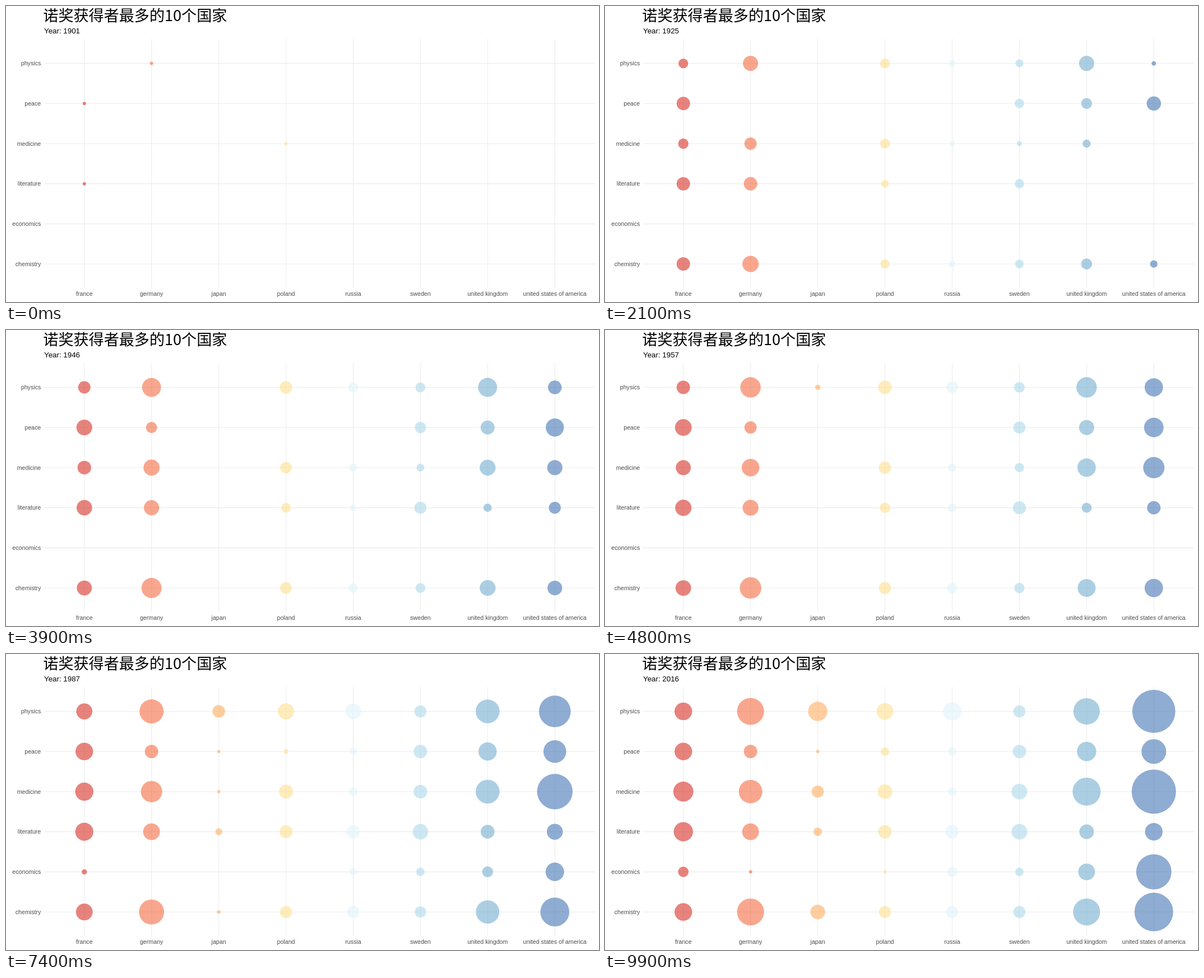
Animation of 1058 by 529 pixels, one loop 10000 ms. Source, as an HTML page with a canvas:

```html
<!DOCTYPE html>
<html lang="zh-CN">
<head>
<meta charset="utf-8">
<style>
  html, body { margin: 0; width: 100%; height: 100%; overflow: hidden; background: #fff; }
  canvas { display: block; }
</style>
</head>
<body>
<canvas id="chart" width="1058" height="529"></canvas>
<script>
const ctx = document.getElementById("chart").getContext("2d");
const FRAMES = 100, FRAME_MS = 100, FIRST = 1901, SPAN = 115;
const fields = ["physics", "peace", "medicine", "literature", "economics", "chemistry"];
const countries = [], bubbles = [];
const columnX = i => 139.75 + 119.92 * i;
const rowY = i => 102.55 + 71.7 * i;
const frameOf = year => Math.round((year - FIRST) * (FRAMES - 1) / SPAN);

// Each field: first and last award year, final number of laureates, and
// optionally the pace (exponent) at which the radius approaches its final size.
function country(name, color, awards) {
  const x = columnX(countries.push(name) - 1);
  for (const [field, [first, last, total, pace = 0.5 + 2 / total ** 2]] of Object.entries(awards)) {
    bubbles.push({
      x, y: rowY(fields.indexOf(field)), color, pace,
      growth: 4.5 * Math.sqrt(total - 1),
      start: frameOf(first), end: frameOf(last)
    });
  }
}

country("france", "#d73027", {
  physics: [1903, 2007, 9],
  peace: [1901, 1968, 9, 0.35],
  medicine: [1907, 2008, 12],
  literature: [1901, 2014, 11, 0.3],
  economics: [1983, 2005, 3],
  chemistry: [1906, 2016, 9, 0.2]
});
country("germany", "#f46d43", {
  physics: [1901, 2016, 23, 0.45],
  peace: [1926, 1973, 5, 0.3],
  medicine: [1905, 2008, 17],
  literature: [1902, 1972, 8, 0.25],
  economics: [2005, 2005, 1],
  chemistry: [1902, 2007, 23, 0.4]
});
country("japan", "#fdae61", {
  physics: [1949, 2015, 11, 1],
  peace: [1974, 1974, 1],
  medicine: [1987, 2016, 4, 1.5],
  literature: [1968, 1994, 2],
  chemistry: [1981, 2010, 6, 2]
});
country("poland", "#fee090", {
  physics: [1903, 1992, 8],
  peace: [1983, 1995, 2],
  medicine: [1901, 1999, 6, 0.4],
  literature: [1905, 1999, 5],
  economics: [1994, 1994, 1],
  chemistry: [1911, 1950, 4, 0.4]
});
country("russia", "#e0f3f8", {
  physics: [1911, 2010, 10, 0.8],
  peace: [1975, 1990, 2],
  medicine: [1904, 1950, 2],
  literature: [1933, 1987, 5, 0.8],
  economics: [1973, 2007, 3],
  chemistry: [1910, 1977, 4]
});
country("sweden", "#abd9e9", {
  physics: [1912, 1981, 4, 0.4],
  peace: [1908, 1982, 5, 0.35],
  medicine: [1911, 2000, 7, 1.1],
  literature: [1909, 1990, 7, 0.45],
  economics: [1974, 1977, 2],
  chemistry: [1903, 2015, 4, 0.3]
});
country("united kingdom", "#74add1", {
  physics: [1904, 2016, 22, 0.4],
  peace: [1903, 1998, 11],
  medicine: [1922, 2016, 25],
  literature: [1932, 1995, 6],
  economics: [1972, 2016, 8],
  chemistry: [1904, 2009, 23, 0.7]
});
country("united states of america", "#4575b4", {
  physics: [1923, 2012, 63, 1],
  peace: [1906, 2009, 19, 0.4],
  medicine: [1933, 2009, 67, 0.7],
  literature: [1930, 2016, 9, 0.3],
  economics: [1970, 2014, 41, 0.8],
  chemistry: [1914, 2015, 50, 1]
});

function radiusAt({ start, end, growth, pace }, frame) {
  if (frame < start) return 0;
  const progress = frame < end ? (frame - start) / (end - start) : 1;
  return 3 + growth * progress ** pace;
}

function text(str, x, y, size, color, align = "left", family = '"Liberation Sans", Arial, sans-serif') {
  ctx.font = `${size}px ${family}`;
  ctx.fillStyle = color;
  ctx.textAlign = align;
  ctx.fillText(str, x, y);
}

function line(x1, y1, x2, y2) {
  ctx.beginPath();
  ctx.moveTo(x1, y1);
  ctx.lineTo(x2, y2);
  ctx.stroke();
}

function draw(frame) {
  ctx.fillStyle = "#fff";
  ctx.fillRect(0, 0, 1058, 529);
  ctx.strokeStyle = "#ebebeb";
  ctx.lineWidth = 1.07;
  fields.forEach((name, i) => {
    line(68, rowY(i), 1051, rowY(i));
    text(name, 62.3, Math.round(rowY(i) + 3.8), 10.67, "#4d4d4d", "right");
  });
  countries.forEach((name, i) => {
    line(columnX(i), 59, columnX(i), 504);
    text(name, columnX(i), 518, 10.67, "#4d4d4d", "center");
  });
  text("诺奖获得者最多的10个国家", 66.3, 27, 27.1, "#000", "left", '"Noto Sans CJK SC", "Noto Sans CJK", sans-serif');
  text("Year: " + Math.round(FIRST + frame * SPAN / (FRAMES - 1)), 68, 49, 13.33, "#000");

  ctx.globalAlpha = 0.6;
  for (const bubble of bubbles) {
    ctx.fillStyle = bubble.color;
    ctx.beginPath();
    ctx.arc(bubble.x, bubble.y, radiusAt(bubble, frame), 0, 2 * Math.PI);
    ctx.fill();
  }
  ctx.globalAlpha = 1;
}

function tick() {
  draw(Math.floor(performance.now() / FRAME_MS) % FRAMES);
  requestAnimationFrame(tick);
}
tick();
</script>
</body>
</html>
```
